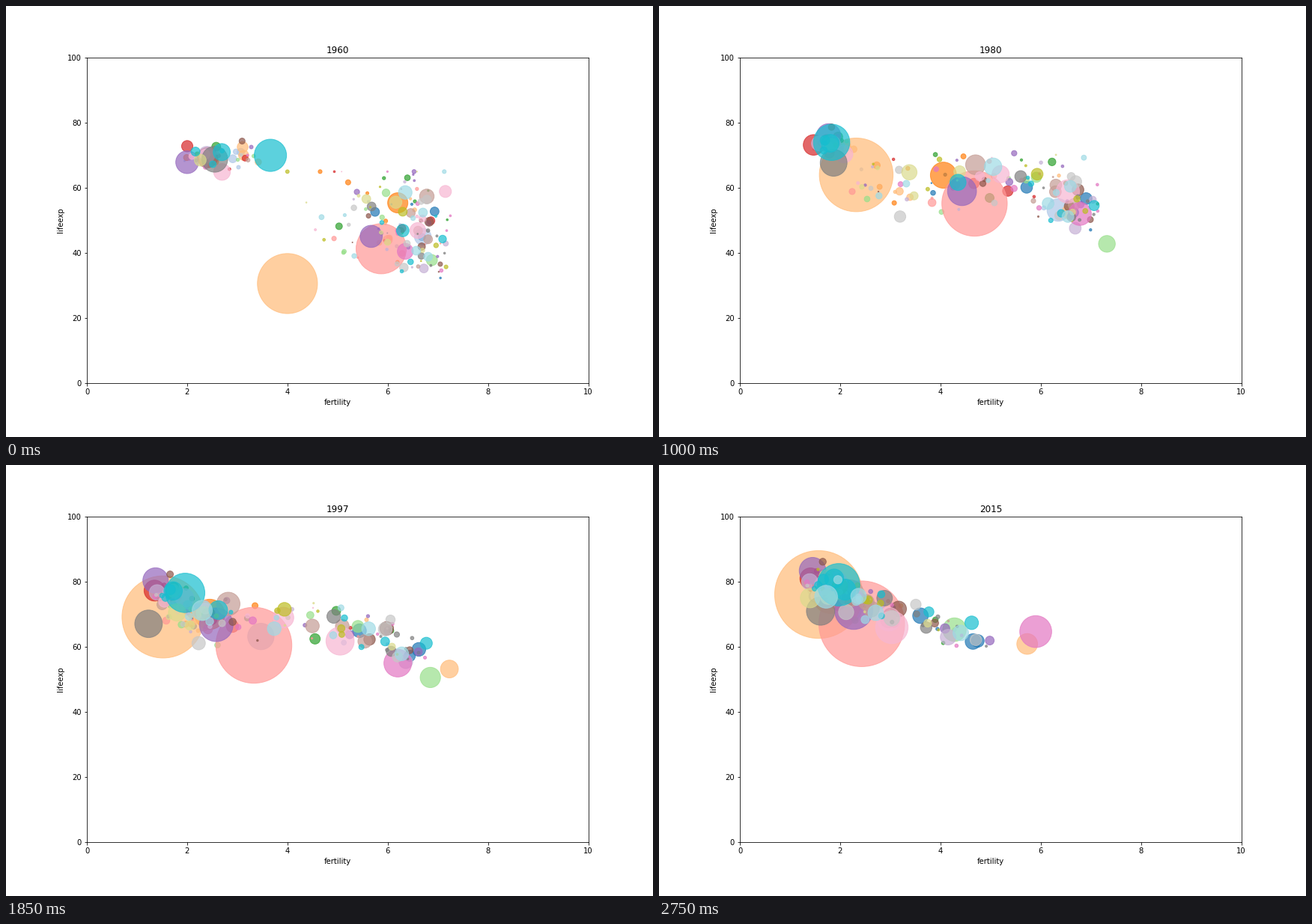
A matplotlib script for the animation above (2.8 s loop, 864 by 576 pixels).

```python
import numpy as np
import matplotlib.pyplot as plt
from matplotlib.animation import FuncAnimation

plt.rcParams["font.family"] = "DejaVu Sans"
plt.rcParams["font.size"] = 10

YEARS = np.arange(1960, 2016)
KEY_YEARS = (1960, 1980, 1997, 2015)
T = np.linspace(0, 1, len(YEARS))
SMALL = 165

(BLUE, LBLUE, ORANGE, LORANGE, GREEN, LGREEN, RED, LRED, PURPLE, LPURPLE,
 BROWN, LBROWN, PINK, LPINK, GREY, LGREY, OLIVE, LOLIVE, CYAN, LCYAN) = range(20)

bubbles = []


def mix(start, end, amount=T):
    return start + (end - start) * amount


def curve(*values):
    """Smooth cubic through the four key years."""
    mid = np.mean(KEY_YEARS)
    return np.polyval(np.polyfit(KEY_YEARS - mid, values, 3), YEARS - mid)


def fall(middle, width):
    """S-shaped change from 0 to 1."""
    return 1 / (1 + np.exp((middle - YEARS) / width))


def add(colour, pop, fert, life):
    """Yearly values; population is in millions."""
    bubbles.append((colour, pop, fert, life))


# The largest countries, each a curve through a few points.
add(LBLUE, mix(50, 161), curve(6.7, 6.35, 3.47, 2.13), curve(45, 53.2, 63.2, 71.6))
add(ORANGE, mix(73, 207), curve(6.2, 4.06, 2.45, 1.8), curve(55.4, 63.9, 70, 75.5))
add(LORANGE, mix(15, 77), curve(6, 6.57, 7.23, 5.73), curve(44, 52.6, 53.2, 60.9))
add(LGREEN, mix(22, 99), curve(6.88, 7.32, 6.85, 4.28), curve(37.8, 42.8, 50.6, 65.3))
add(RED, mix(73, 81), curve(2.41, 1.47, 1.35, 1.41), curve(69.3, 73.2, 77.3, 81))
add(LRED, mix(450, 1311), curve(5.87, 4.68, 3.33, 2.43), curve(41.3, 55.2, 60.5, 67.1))
add(PURPLE, mix(88, 258), curve(5.67, 4.43, 2.58, 2.27), curve(45.1, 59, 66.8, 71.2))
add(PURPLE, mix(93, 127), curve(2, 1.77, 1.37, 1.45), curve(67.9, 76, 80.4, 83.4))
add(LBROWN, mix(38, 127), curve(6.78, 4.7, 2.82, 2.2), curve(57.4, 67.1, 73.2, 76.5))
add(PINK, mix(45, 182), curve(6.35, 6.78, 6.2, 5.9), curve(40.5, 52, 55, 64.7))
add(LPINK, mix(45, 189), curve(6.6, 6.54, 5.05, 3.03), curve(46.9, 58.9, 61.8, 66))
add(LPINK, mix(26, 101), curve(7.15, 5.2, 3.92, 2.97), curve(58.9, 64.2, 69, 68.5))
add(GREY, mix(120, 143), curve(2.55, 1.87, 1.23, 1.61), curve(68.8, 67.7, 67.1, 71))
add(LOLIVE, mix(27, 68), curve(6.16, 3.38, 1.8, 1.4), curve(55.6, 64.8, 70.6, 75))
add(CYAN, mix(28, 79), curve(6.3, 4.35, 2.62, 2.1), curve(46.9, 61.7, 71.3, 77.6))
add(CYAN, mix(52, 65), curve(2.69, 1.8, 1.72, 1.88), curve(71, 73.7, 77.2, 81))
add(CYAN, mix(186, 321), curve(3.66, 1.83, 1.96, 1.97), curve(70, 74, 76.6, 79.1))
add(LCYAN, mix(33, 93), curve(6.35, 5.05, 2.3, 1.72), curve(58.6, 66.5, 71.2, 75.4))

# The largest bubble swings out sharply before it settles.
turns = (1960, 1961, 1963, 1970, 1980, 1985, 1997, 2015)
add(LORANGE, mix(644, 1376, 1 - (1 - T) ** 1.3),
    np.interp(YEARS, turns, (4, 3.3, 7.4, 5.7, 2.32, 2.65, 1.52, 1.57)),
    np.interp(YEARS, turns, (30.6, 33.5, 50, 60.5, 64, 66, 69.2, 76.1)))

# All others: an early, long-lived group and a late, fast-growing one.
rng = np.random.default_rng(12)
for i in range(SMALL):
    size = np.exp(rng.normal(0.9, 1.5))
    if rng.random() < 0.27:
        pop = mix(1, 1.35) * min(size * 1.5, 50)
        fert = mix(rng.uniform(2, 3.5), rng.uniform(1.3, 2), fall(rng.normal(1973, 4), 5))
        life = mix(rng.normal(69.5, 2), rng.normal(79.5, 2.5))
    else:
        pop = mix(1, 3.1) * min(size, 14)
        first = max(7.4 - rng.gamma(2, 0.45), 4)
        fert = mix(first, rng.uniform(1.5, 2.4), fall(rng.uniform(1967, 2020), 7))
        start = np.clip(rng.normal(50 - 4 * (first - 6.4), 8), 31, 65)
        end = rng.normal(79 - 5.2 * (fert[-1] - 1.5), 2.5)
        life = mix(start, end, T ** 0.8)
    add(i * 20 // SMALL, pop, fert, life)

bubbles.sort(key=lambda b: b[0])
colours, pops, ferts, lives = (np.array(part) for part in zip(*bubbles))

fig, ax = plt.subplots(figsize=(12, 8), dpi=72)
fig.subplots_adjust(left=0.125, right=0.9, bottom=0.125, top=0.88)
ax.set(xlim=(0, 10), ylim=(0, 100), xlabel="fertility", ylabel="lifeexp")
title = ax.set_title("1960", fontsize=12)
dots = ax.scatter(ferts[:, 0], lives[:, 0], s=pops[:, 0] * 10,
                  c=plt.get_cmap("tab20")(colours), alpha=0.7)


def update(n):
    dots.set_offsets(np.column_stack((ferts[:, n], lives[:, n])))
    dots.set_sizes(pops[:, n] * 10)
    title.set_text(str(YEARS[n]))
    return dots, title


anim = FuncAnimation(fig, update, frames=len(YEARS), interval=50, repeat=True)
plt.show()
```
